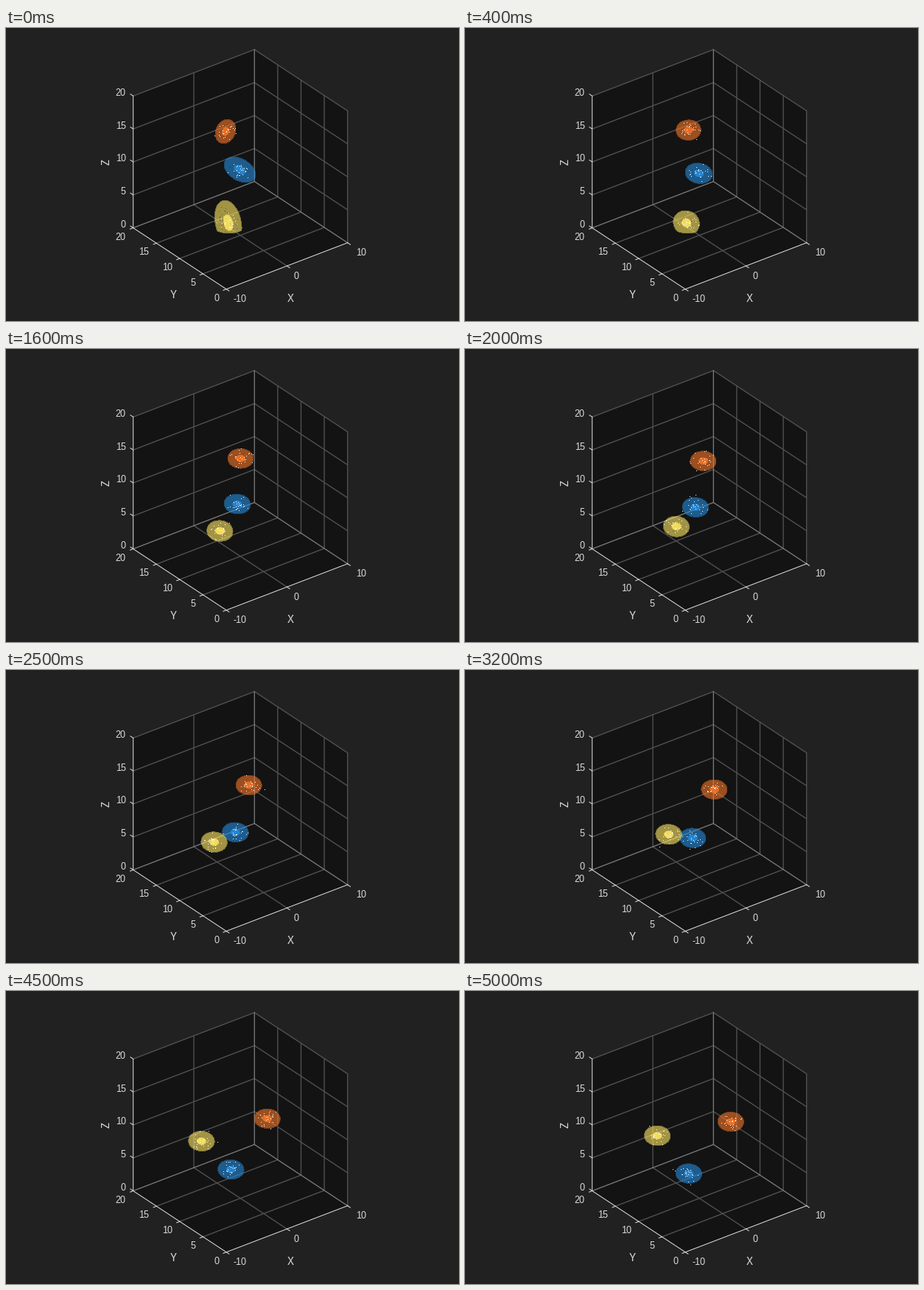
Animation of 615 by 398 pixels, one loop 5.1 s. Source, as a matplotlib script:

```python
import numpy as np
import matplotlib.pyplot as plt
from matplotlib.animation import FuncAnimation
from matplotlib.patches import Polygon

W, H, DPI = 615, 398, 100
FRAMES, STEP_MS = 51, 100
PX = 72 / DPI
WHITE, TEXT = "#e0e0e0", "#d9d9d9"

plt.rcParams.update({"font.family": "Liberation Sans",
                     "text.hinting": "native", "text.hinting_factor": 1})
fig = plt.figure(figsize=(W / DPI, H / DPI), dpi=DPI, facecolor="#212121")
ax = fig.add_axes([0, 0, 1, 1])
ax.set_xlim(-0.5, W - 0.5)
ax.set_ylim(H - 0.5, -0.5)
ax.axis("off")

# Orthographic projection: x in -10..10, y and z in 0..20
ORIGIN = np.array([298.6, 354.2])
EX = np.array([8.23, -3.15])
EY = np.array([-6.32, -4.16])
EZ = np.array([0, -8.96])


def project(x, y, z):
    return ORIGIN + (x + 10) * EX + y * EY + z * EZ


def line(points, color, width=1.0):
    ax.plot(*np.transpose(points), color=color, lw=width * PX, zorder=1,
            solid_joinstyle="miter", snap=False)


def path(points, color, width=1.0):
    line([project(*p) for p in points], color, width)


def tick(point, direction):
    start = project(*point)
    line([start, start + 4.5 * direction / np.hypot(*direction)], WHITE)


def label(x, y, text, size=13.33, ha="center", va="center_baseline", **kw):
    ax.text(x, y, text, color=TEXT, fontsize=size * PX, ha=ha, va=va, **kw)


def draw_box():
    walls = [
        [(-10, 20, 0), (10, 20, 0), (10, 20, 20), (-10, 20, 20)],
        [(10, 20, 0), (10, 0, 0), (10, 0, 20), (10, 20, 20)],
        [(-10, 0, 0), (10, 0, 0), (10, 20, 0), (-10, 20, 0)],
    ]
    for wall in walls:
        ax.add_patch(Polygon([project(*p) for p in wall], fc="#131313",
                             ec="none", zorder=0))

    grid, edge = "#505050", "#7c7c7c"
    path([(0, 0, 0), (0, 20, 0), (0, 20, 20)], grid, 1.4)
    for v in (5, 10, 15):
        path([(-10, v, 0), (10, v, 0), (10, v, 20)], grid, 1.4)
        path([(-10, 20, v), (10, 20, v), (10, 0, v)], grid, 1.4)
    path([(-10, 20, 20), (10, 20, 20), (10, 0, 20), (10, 0, 0)], grid, 1.4)
    path([(-10, 20, 0), (10, 20, 0), (10, 0, 0)], edge, 1.3)
    path([(10, 20, 0), (10, 20, 20)], edge, 1.3)
    path([(-10, 20, 20), (-10, 20, 0), (-10, 0, 0), (10, 0, 0)], WHITE)

    for v in range(0, 21, 5):
        tick((-10, 20, v), EY)
        tick((-10, v, 0), -EX)
        x, y = project(-10, 20, v)
        label(x - 10, y - 5.5, str(v), ha="right")
        x, y = project(-10, v, 0)
        label(x - 10, y + 11, str(v), ha="right")
    for v in (-10, 0, 10):
        tick((v, 0, 0), -EY)
        x, y = project(v, 0, 0)
        label(x + (18 if v else 13), y + 12.5, str(v))
    label(385.5, 366, "X", 14.67)
    label(226.5, 361, "Y", 14.67)
    label(136, 182, "Z", 14.67, va="center", rotation=90)


def sphere_mesh(faces=20):
    """Meridians and parallels of a unit sphere seen from 30 degrees above."""
    turn = np.linspace(0, 2 * np.pi, 49)
    rise = np.linspace(-np.pi / 2, np.pi / 2, 49)
    curves = [(lon + 0 * rise, rise)
              for lon in np.linspace(0, 2 * np.pi, faces, endpoint=False)]
    curves += [(turn, lat + 0 * turn)
               for lat in np.linspace(-np.pi / 2, np.pi / 2, faces)[1:-1]]
    us, vs = [], []
    for lon, lat in curves:
        us += [np.cos(lat) * np.sin(lon), [np.nan]]
        vs += [0.5 * np.cos(lat) * np.cos(lon) - 0.866 * np.sin(lat), [np.nan]]
    return np.array([np.concatenate(us), np.concatenate(vs)])


MESH = sphere_mesh()
ANGLE = np.linspace(0, 2 * np.pi, 73)
RING = np.array([np.cos(ANGLE), np.sin(ANGLE)])
SETTLED = np.array([17.3, 12.8, 0.03])  # half width, half height, tilt


def floor_y(x):
    """Front rim where a body is cut off by the ground."""
    return 278 - 0.012 * (x - 302) ** 2


class Track:
    """Extent ellipse that settles quickly and drifts at a fixed speed."""

    def __init__(self, color, start, speed, offset, shape, grounded=False):
        self.start, self.speed = np.array(start), np.array(speed)
        self.offset, self.shape = np.array(offset), np.array(shape)
        self.grounded = grounded
        self.body = self.add_fill(color, 0.35)
        self.mesh, = ax.plot([], [], color=color, lw=0.7 * PX, alpha=0.4,
                             antialiased=False, zorder=3)
        self.core = self.add_fill(color, 0.85)
        self.dots, = ax.plot([], [], ",", color="white", zorder=3)

    @staticmethod
    def add_fill(color, alpha):
        return ax.add_patch(Polygon(RING.T, fc=color, ec="none", alpha=alpha,
                                    zorder=3))

    def cut(self, points):
        if self.grounded:
            points[1] = np.minimum(points[1], floor_y(points[0]))
        return points

    def update(self, n, rng):
        fade = 1 / (1 + n)
        a, b, tilt = SETTLED + fade * (self.shape - SETTLED)
        center = self.start + n * self.speed + fade ** 2 * self.offset
        matrix = np.array([[a, 0], [tilt * b, b * np.sqrt(1 - tilt ** 2)]])

        def place(points):
            return self.cut(center[:, None] + matrix @ points)

        hits = 0.42 * SETTLED[:2, None] * rng.normal(size=(2, 26))
        self.body.set_xy(place(RING).T)
        self.core.set_xy(place(0.37 * RING).T)
        self.mesh.set_data(*place(MESH))
        self.dots.set_data(*np.round(self.cut(center[:, None] + hits)))
        return self.body, self.mesh, self.core, self.dots


draw_box()
tracks = [
    Track("#268cdd", (318.3, 192.5), (-0.3, 1.1), (-1.3, -0.5),
          (21, 17, 0.4)),
    Track("#f57729", (297.9, 134.6), (1.25, 0.85), (-0.3, 5.4),
          (13.5, 16, -0.2)),
    Track("#ffe864", (303.6, 270.4), (-0.86, -1.488), (-2.4, -6.4),
          (18, 30, 0.25), grounded=True),
]


def update(n):
    rng = np.random.default_rng(n)
    return [artist for track in tracks for artist in track.update(n, rng)]


anim = FuncAnimation(fig, update, frames=FRAMES, interval=STEP_MS,
                     repeat=True, repeat_delay=0)
plt.show()
```
